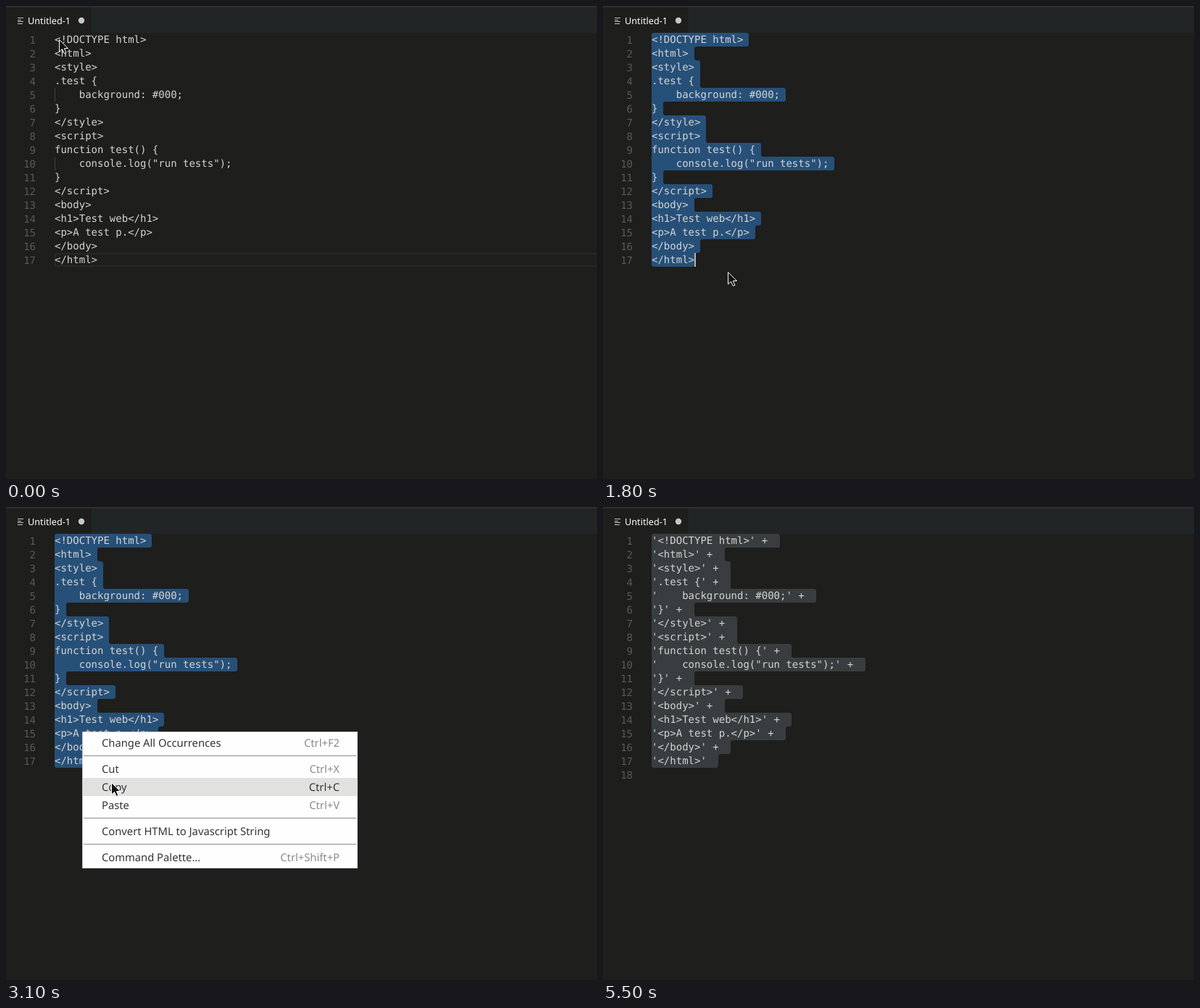
An HTML page for the animation above (5.6 s loop, 815 by 653 pixels).

```html
<!DOCTYPE html>
<html lang="en">
<head>
<meta charset="utf-8">
<title>Convert HTML to string</title>
<style>
html, body { margin: 0; width: 100%; height: 100%; overflow: hidden; background: #1e1e1d; }
svg { display: block; }
text { white-space: pre; text-rendering: geometricPrecision; }
.code, .nums { font: 14px "DejaVu Sans Mono", monospace; }
.code { fill: #d4d4d4; }
.nums { fill: #5a5a5a; text-anchor: end; }
.tab { font: 12.7px "Noto Sans", sans-serif; fill: #fff; }
.menu text { font: 14.75px "Noto Sans", sans-serif; fill: #333; }
.menu .key { fill: #8a8a8a; text-anchor: end; }
.menu .on .key { fill: #333; }
.menu .row { fill: none; }
.menu .on .row { fill: #e1e1e0; }
</style>
</head>
<body>
<svg id="stage" width="815" height="653" viewBox="0 0 815 653">
  <rect width="815" height="653" fill="#1e1e1d"/>
  <rect x="118" width="697" height="37" fill="#222526"/>
  <rect width="815" height="2" fill="#2c2f30"/>
  <path d="M16 16.5h8M16 19.5h5M16 21.5h8M16 24.5h7" stroke="#c5c5c5"/>
  <text class="tab" x="30" y="25">Untitled-1</text>
  <circle cx="104" cy="20" r="4.2" fill="#c8c8c6"/>
  <path id="current" d="M815 342H68V359H815" fill="none" stroke="#282828" stroke-width="2"/>
  <path id="guides" d="M67.5 113v19M67.5 208v19" stroke="#404040"/>
  <path id="selection"/>
  <g id="nums" class="nums"></g>
  <g id="before" class="code"></g>
  <g id="after" class="code"></g>
  <rect id="caret" width="2" height="19" fill="#b4b5b3"/>
  <g id="menu" class="menu">
    <rect x="105.5" y="310.5" width="379" height="188" fill="#fefefe" stroke="#c4c4c4"/>
    <path d="M107 343.5H483M107 429.5H483M107 465.5H483" stroke="#8c8c8c"/>
  </g>
  <path id="arrow" d="M-.5 -.5V16L3.5 12.5L6.3 18.5L9 17.3L6.3 11.5H11.5Z" fill="#111" stroke="#fff"/>
  <g id="beam" fill="none">
    <path d="M-3 -7.5H3M0 -7.5V7.5M-3 7.5H3" stroke="#fff" stroke-width="3"/>
    <path d="M-3 -7.5H3M0 -7.5V7.5M-3 7.5H3" stroke="#111"/>
  </g>
</svg>
<script>
const LOOP = 5600, STEP = 100;
const LEFT = 67, TOP = 37, ROW = 19, CHAR = 8.43;

// Moments of the story, in ms
const DRAG = 500, ALL = 1700, MENU = 2600, CONVERT = 3800, MOVE = 4200, LEAVE = 5300, BLUR = 5400;

const source = `<!DOCTYPE html>
<html>
<style>
.test {
    background: #000;
}
</style>
<script>
function test() {
    console.log("run tests");
}
<\/script>
<body>
<h1>Test web</h1>
<p>A test p.</p>
</body>
</html>`.split("\n");
const last = source.length - 1;
const converted = source.map((s, i) => `'${s}' ${i < last ? "+ " : ""}`);

const el = id => document.getElementById(id);
const show = (id, on) => { el(id).style.display = on ? "" : "none"; };

function add(parent, tag, attrs, content = "") {
  const node = document.createElementNS("http://www.w3.org/2000/svg", tag);
  for (const k in attrs) node.setAttribute(k, attrs[k]);
  node.textContent = content;
  return parent.appendChild(node);
}

const addLines = (id, lines) =>
  lines.forEach((s, i) => add(el(id), "text", { x: LEFT, y: TOP + 14 + i * ROW }, s));

addLines("before", source);
addLines("after", converted);
const numbers = Array.from({ length: 18 }, (_, i) =>
  add(el("nums"), "text", { x: 41, y: TOP + 15 + i * ROW }, i + 1));

// Label, shortcut, vertical centre
const items = [
  ["Change All Occurrences", "Ctrl+F2", 326],
  ["Cut", "Ctrl+X", 362],
  ["Copy", "Ctrl+C", 387],
  ["Paste", "Ctrl+V", 412],
  ["Convert HTML to Javascript String", "", 448],
  ["Command Palette...", "Ctrl+Shift+P", 484]
].map(([label, key, y]) => {
  const g = add(el("menu"), "g", {});
  add(g, "rect", { class: "row", x: 106, y: y - 13, width: 378, height: 25 });
  add(g, "text", { x: 132, y: y + 5 }, label);
  add(g, "text", { class: "key", x: 460, y: y + 5 }, key);
  return { g, y };
});

// Pointer path: time, x, y
const path = [
  [0, 74, 47], [400, 74, 47], [1100, 126, 190], [1800, 173, 368],
  [2500, 104, 311], [2700, 104, 311], [2900, 115, 318], [3300, 176, 443],
  [3600, 183, 451], [4100, 183, 451], [4600, 365, 334], [4700, 374, 300],
  [5200, 367, 9], [LOOP, 367, 9]
];

function pointerAt(t) {
  const i = path.findIndex(p => p[0] > t);
  const [t0, x0, y0] = path[i - 1], [t1, x1, y1] = path[i];
  const k = (t - t0) / (t1 - t0);
  return { x: Math.round(x0 + (x1 - x0) * k), y: Math.round(y0 + (y1 - y0) * k) };
}

function roundedPath(points, r) {
  const toward = (a, b) => {
    const d = Math.hypot(b[0] - a[0], b[1] - a[1]);
    const k = Math.min(r, d / 2) / d;
    return [a[0] + (b[0] - a[0]) * k, a[1] + (b[1] - a[1]) * k];
  };
  const n = points.length;
  return points.map((p, i) => {
    const from = toward(p, points[(i + n - 1) % n]);
    const to = toward(p, points[(i + 1) % n]);
    return `${i ? "L" : "M"}${from}Q${p} ${to}`;
  }).join("") + "Z";
}

// Outline of the selected rows, line breaks included
function selectionPath(lines, row, col) {
  const widths = lines.slice(0, row).map(s => s.length + 1);
  if (col > 0) widths.push(col);
  if (!widths.length) return "";
  const points = [[LEFT, TOP]];
  widths.forEach((w, i) => {
    const x = LEFT + Math.floor(w * CHAR), y = TOP + i * ROW;
    if (w !== widths[i - 1]) points.push([x, y]);
    if (w !== widths[i + 1]) points.push([x, y + ROW]);
  });
  points.push([LEFT, TOP + widths.length * ROW]);
  return roundedPath(points, 3);
}

function selectionEnd(t, p) {
  if (t < DRAG) return [0, 0];
  if (t >= CONVERT) return [last + 1, 0];
  if (t >= ALL) return [last, source[last].length];
  const row = Math.floor((p.y - TOP) / ROW);
  return [row, Math.min(source[row].length, Math.round((p.x - LEFT) / CHAR))];
}

// Solid while dragging, then blinking every half second
function caretOn(t) {
  if (t < DRAG || t >= BLUR) return false;
  if (t < ALL) return true;
  return Math.floor((t - (t < CONVERT ? ALL : CONVERT)) / 500) % 2 === 0;
}

function render(t) {
  const p = pointerAt(t);
  const done = t >= CONVERT;
  const [row, col] = selectionEnd(t, p);

  show("before", !done);
  show("after", done);
  show("guides", !done);
  show("current", t < DRAG);
  numbers[17].style.display = done ? "" : "none";

  el("selection").setAttribute("d", selectionPath(done ? converted : source, row, col));
  el("selection").setAttribute("fill", t < BLUR ? "#275078" : "#393d3f");
  show("caret", caretOn(t));
  el("caret").setAttribute("x", LEFT + Math.floor(col * CHAR));
  el("caret").setAttribute("y", TOP + row * ROW);

  show("menu", t >= MENU && !done);
  for (const { g, y } of items)
    g.setAttribute("class", p.x > 105 && Math.abs(p.y - y) <= 12.5 ? "on" : "");

  const beam = t >= MOVE && p.y > TOP;
  show("beam", beam);
  show("arrow", !beam && t < LEAVE);
  el("beam").setAttribute("transform", `translate(${p.x + 0.5} ${p.y})`);
  el("arrow").setAttribute("transform", `translate(${p.x} ${p.y})`);
}

const start = performance.now();
function tick() {
  const t = (performance.now() - start) % LOOP;
  render(Math.floor(t / STEP) * STEP);
  requestAnimationFrame(tick);
}
tick();
</script>
</body>
</html>
```
